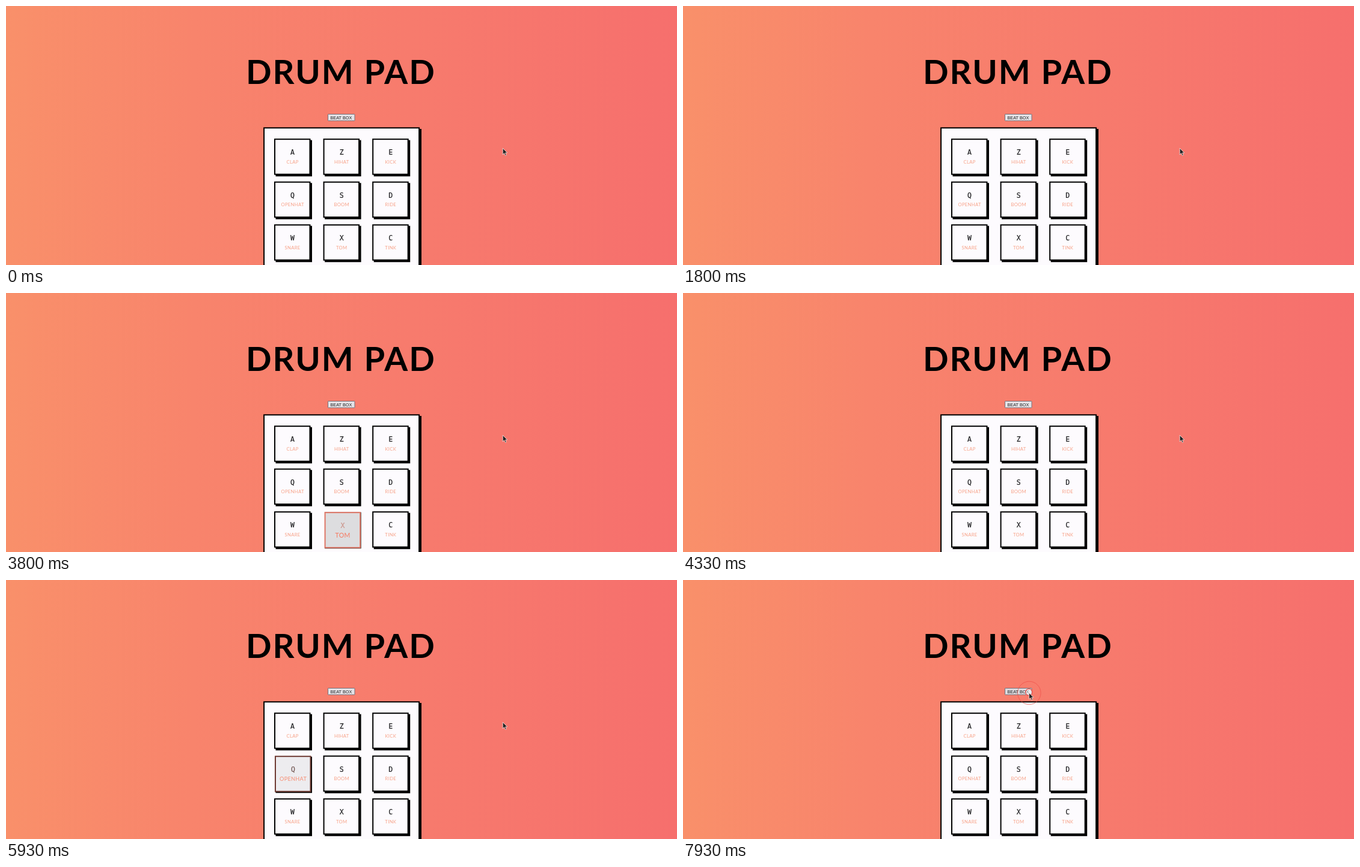
These frames come from a looping animation (1116x432 px, 8 s). An HTML page:

```html
<!DOCTYPE html>
<html lang="en">
<head>
<meta charset="utf-8">
<title>Drum pad</title>
<style>
  html, body { margin: 0; width: 100%; height: 100%; overflow: hidden; }
  body { background: linear-gradient(91deg, #f9906a 0%, #f8846c 28%, #f77b6d 60%, #f66f6d 100%); }
  svg { display: block; width: 1116px; height: 432px; }
  .title { font: 700 56px Lato, sans-serif; letter-spacing: 2px; }
  .button { font: 7.3px "Liberation Sans", Arial, sans-serif; fill: #222; }
  .letter { font: 11.5px "DejaVu Sans Mono", monospace; stroke-width: .2; text-anchor: middle; }
  .label { font: 7.7px Lato, sans-serif; letter-spacing: .3px; text-anchor: middle; }
</style>
</head>
<body>
<svg viewBox="0 0 1116 432">
  <text class="title" x="399" y="130">DRUM</text>
  <text class="title" x="595.5" y="130">PAD</text>
  <rect id="button" x="535.5" y="180.5" width="44.5" height="10.8" rx=".6" stroke="#77717a" stroke-width="1"/>
  <text class="button" x="539.5" y="188.7">BEAT BOX</text>
  <rect x="431" y="205" width="260" height="240"/>
  <rect x="429.1" y="203.3" width="258" height="240" fill="#fdfbfe" stroke="#000" stroke-width="2"/>
  <g id="keys"></g>
  <g id="ripple" fill="none" stroke="#ef4a45">
    <circle id="wave" cx="575.8" cy="188.4"/>
    <circle cx="575.3" cy="187.2" r="5.6" fill="#fff" fill-opacity=".45" stroke-width="1.2"/>
  </g>
  <path id="cursor" d="M0 0V10.6L2.5 8.4L4.2 12.2L6 11.4L4.3 7.7H7.6Z"
    fill="#222" stroke="#f4e4e2" stroke-width=".8" stroke-linejoin="round"/>
</svg>
<script>
const LOOP = 8000, STEP = 1000 / 15, PRESS = 267;
const SIZE = 60.5, SHADOW = 2.5;
const pads = {
  A: "CLAP", Z: "HIHAT", E: "KICK",
  Q: "OPENHAT", S: "BOOM", D: "RIDE",
  W: "SNARE", X: "TOM", C: "TINK"
};
const hits = [
  ["Q", 400], ["C", 570], ["Z", 733],
  ["Q", 1800], ["C", 1970], ["A", 2133],
  ["Q", 3270], ["E", 3467], ["X", 3667], ["A", 4000], ["C", 4000],
  ["Q", 4467], ["E", 4670], ["W", 4930],
  ["Q", 5867], ["X", 6133]
];

const byId = id => document.getElementById(id);
const clamp = v => Math.max(0, Math.min(1, v));
const lerp = (a, b, p) => a + (b - a) * p;
const mix = (a, b, p) => `rgb(${a.map((v, i) => Math.round(lerp(v, b[i], p)))})`;
const smooth = p => p * p * (3 - 2 * p);

function add(parent, tag, attrs, text = "") {
  const el = document.createElementNS("http://www.w3.org/2000/svg", tag);
  set(el, attrs);
  el.textContent = text;
  return parent.appendChild(el);
}

function set(el, attrs) {
  for (const name in attrs) el.setAttribute(name, attrs[name]);
}

const keys = Object.entries(pads).map(([letter, name], i) => {
  const x = 446 + (i % 3) * 81.6, y = 221.2 + Math.floor(i / 3) * 71.5;
  const group = add(byId("keys"), "g", {});
  return {
    letter, x, y, group,
    shadow: add(group, "rect", { width: SIZE, height: SIZE }),
    face: add(group, "rect", { x: 1, y: 1, width: SIZE - 2, height: SIZE - 2, "stroke-width": 2 }),
    cap: add(group, "text", { class: "letter", x: 30.5, y: 27 }, letter),
    label: add(group, "text", { class: "label", x: 30.6, y: 41.4 }, name)
  };
});

// Each hit rises and falls linearly.
function pressure(letter, t) {
  return Math.max(0, ...hits.filter(h => h[0] === letter)
    .map(h => clamp(1 - Math.abs((t - h[1]) / PRESS * 2 - 1))));
}

function drawKey(key, t) {
  const p = pressure(key.letter, t);
  const offset = SHADOW - 2 * p;
  const ink = mix([30, 30, 32], [205, 150, 140], p);
  set(key.group, { transform: `translate(${key.x + 2 * p} ${key.y + p})` });
  set(key.shadow, { x: offset, y: offset });
  set(key.face, {
    fill: mix([253, 251, 254], [221, 221, 223], p),
    stroke: mix([0, 0, 0], [224, 118, 102], p)
  });
  set(key.cap, { fill: ink, stroke: ink });
  key.label.style.fontSize = `${7.7 * (1 + .38 * p)}px`;
  set(key.label, { fill: mix([247, 162, 136], [246, 121, 96], p), y: 41.4 + p });
}

function draw(t) {
  keys.forEach(key => drawKey(key, t));

  // The pointer follows a slight upward arc.
  const move = smooth(clamp((t - 6735) / 795));
  const x = lerp(826.2, 575.5, move);
  const y = lerp(237.2, 188.2, move) - 20 * move * (1 - move);
  set(byId("cursor"), { transform: `translate(${x} ${y})` });

  const click = clamp((t - 7667) / 267);
  const down = t >= 7665;
  set(byId("button"), { fill: down ? "#dcdade" : "#e5e3e7" });
  set(byId("ripple"), { visibility: down ? "visible" : "hidden" });
  set(byId("wave"), { r: lerp(6, 19.3, click), opacity: lerp(1, .65, click) });
}

function tick() {
  const t = performance.now() % LOOP;
  draw(Math.floor((t + 5) / STEP) * STEP);
  requestAnimationFrame(tick);
}
tick();
</script>
</body>
</html>
```
